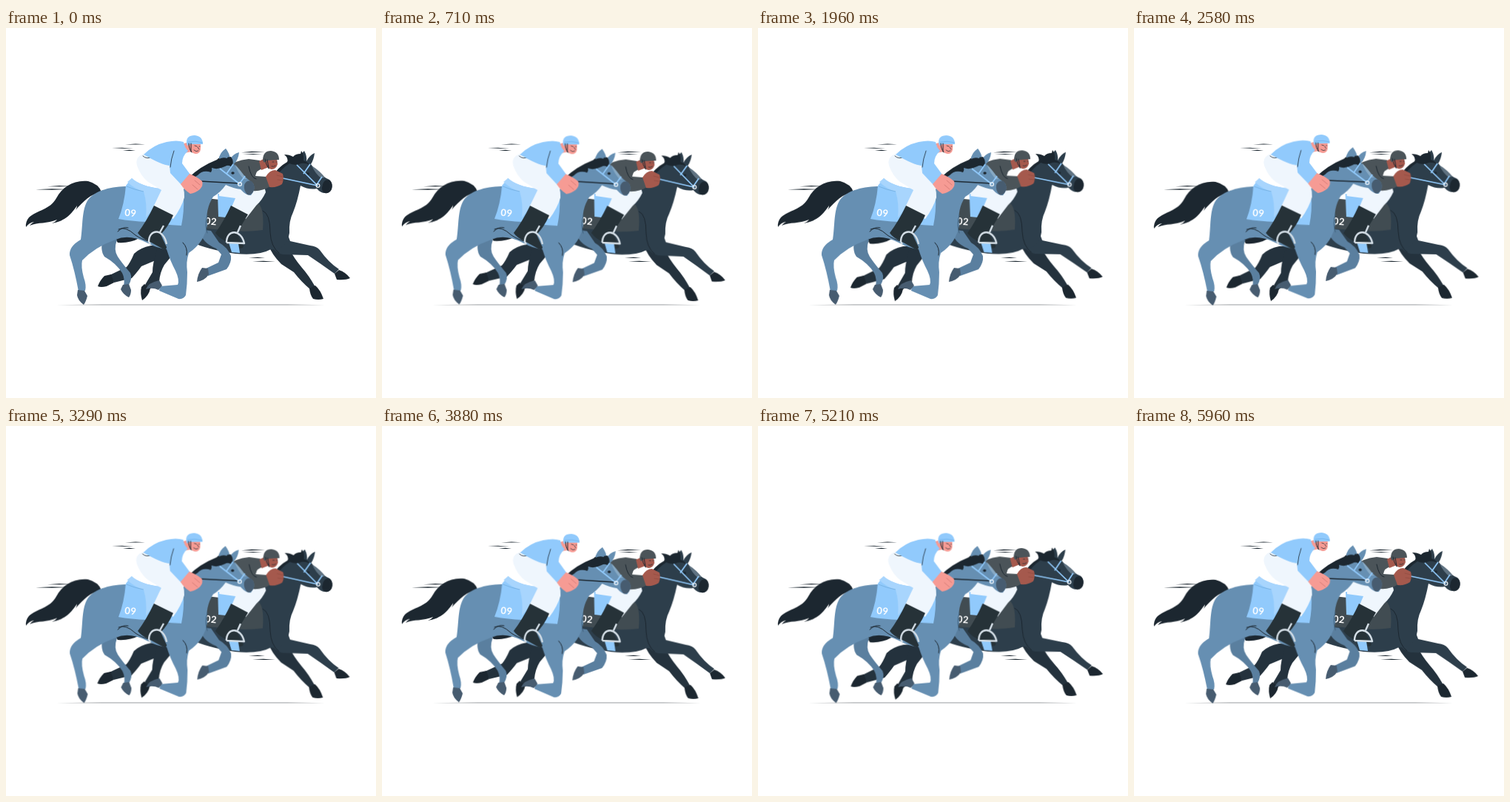
An HTML page that plays this animation: 500 px wide and 500 px high, repeating every 6000 ms.

```html
<!DOCTYPE html>
<html lang="en">
<head>
<meta charset="utf-8">
<title>Horse race</title>
<style>
  html, body { margin: 0; width: 100%; height: 100%; overflow: hidden; background: #fff; }
  svg { display: block; width: 100%; height: 100%; }
  text { font: 700 13px Lato, "Open Sans", sans-serif; letter-spacing: .6px; fill: #fff; }

  .blue { fill: #668fb2; }
  .blue-shade { fill: #5a7f9f; }
  .blue-hoof { fill: #475c70; }
  .navy { fill: #2d3e4b; }
  .navy-shade { fill: #24323d; }
  .ink { fill: #1c2730; }
  .boot { fill: #263238; }
  .sky { fill: #91cafc; }
  .pale { fill: #eff6fd; }
  .pink { fill: #f69b94; }
  .brown { fill: #a5594d; }
  .coal { fill: #4b5459; }
  .line { fill: none; stroke: #1c2730; stroke-width: 1; stroke-linecap: round; stroke-linejoin: round; }
  .strap { fill: none; stroke: #91cafc; stroke-width: 1.7; stroke-linejoin: round; }
  .stirrup { fill: none; stroke: #d5dfe7; stroke-width: 2.4; stroke-linejoin: round; }

  #far { transform-origin: 294px 266px; animation: sway 3s linear infinite; }
  #near { transform-origin: 180px 259px; animation: late-sway 6s linear infinite; }
  @keyframes sway {
    0%, 100% { transform: rotate(0deg); }
    25% { transform: rotate(1deg); }
    75% { transform: rotate(-1deg); }
  }
  /* The same sway after half a second of rest, cut off at the loop's end. */
  @keyframes late-sway {
    0%, 8.333% { transform: rotate(0deg); }
    20.833%, 70.833% { transform: rotate(1deg); }
    45.833%, 95.833% { transform: rotate(-1deg); }
    100% { transform: rotate(-.667deg); }
  }
</style>
</head>
<body>
<svg viewBox="0 0 500 500">
  <path fill="#989c9f" d="M68 374.2 L130 373.6 H380 L431 374.2 L380 374.6 H130Z"/>
  <g class="ink">
    <path d="M143 162 L157 161.8 L172 163 L157 162.8Z"/>
    <path d="M161 157.6 L175 156.4 L188 157.3 L175 157.5Z"/>
    <path d="M158 165.2 L167 164.8 L175 166 L166 166Z"/>
    <path d="M40 218.2 L62 217.2 L85 218 L62 218.7Z"/>
    <path d="M56 214.2 L72 213 L90 213.9 L72 214.3Z"/>
    <path d="M318 168.2 L332 166.8 L350 167.6 L332 168.2Z"/>
    <path d="M320 170.4 L334 169.9 L346 171 L334 171Z"/>
    <path d="M328 310.4 L340 309.8 L350 311 L340 311.1Z"/>
    <path d="M333 315.3 L348 314.7 L364 316 L348 316.1Z"/>
  </g>

  <g id="far">
    <!-- hind legs and tail -->
    <path class="ink" d="M147 276 Q160 271 180 284 Q168 291 151 290 Q146 284 147 276Z"/>
    <path class="navy-shade" d="M196 294 Q181 297 173 305 Q168 317 163 323 L140 334 L146 344 L170 338 Q178 329 183 322 L214 309 L225 293Z"/>
    <path class="ink" d="M142 333 L146 344 L136 349 Q128 351 124 349 Q127 341 133 335Z"/>
    <path class="navy-shade" d="M204 300 Q198 318 198 330 L188 347 L194 353 L207 343 Q208 330 214 320 L232 298Z"/>
    <path class="ink" d="M187 346 L195 352 Q193 362 184 368 Q181 358 183 350Z"/>

    <!-- front legs -->
    <path class="navy-shade" d="M354 292 Q359 306 372 319 L389 330 Q399 343 411 353 L418 350 Q409 334 400 324 Q389 311 382 297Z"/>
    <path class="ink" d="M410 352 L418 348 Q425 354 429 366 Q422 368 415 366 Q411 361 410 352Z"/>
    <path class="navy" d="M352 278 Q358 303 374 306 L408 307 Q426 319 444 332 L450 326 Q436 317 424 300 Q420 295 411 294 L384 288 L378 272Z"/>
    <path class="ink" d="M444 332 L450 327 Q459 330 465 338 Q459 341 447 340Z"/>

    <!-- body, neck and head -->
    <path class="navy" d="M240 238 L340 226 L358 203 Q368 187 381 182 L397 181 Q397 171 403 166 Q407 173 406 180 Q410 172 417 169 Q416 178 412 184 L419 193 Q428 201 437 205 Q442 210 440 217 Q438 224 431 223 Q425 223 420 217 Q409 219 398 213 Q394 234 388 249 Q382 261 383 277 Q379 301 358 299 Q342 308 310 305 Q271 299 250 289Z"/>
    <path class="ink" d="M358 204 Q367 188 380 181 Q382 176 376 171 Q383 171 388 174 Q391 170 398 170 L399 166 Q403 171 402 179 Q408 181 410 185 Q402 181 396 184 Q389 186 383 183 Q372 190 364 202Z"/>
    <path fill="#607382" d="M413 186 Q424 193 431 202 L426 203 Q418 197 413 186Z"/>
    <path class="ink" d="M428 211 Q431 203 438 206 Q442 211 440 218 Q437 224 431 223 Q425 221 428 211Z"/>
    <ellipse class="ink" cx="408" cy="197" rx="2" ry="1.7"/>
    <path class="line" stroke-width=".7" d="M347 247 Q357 251 357 276 Q358 296 369 304"/>
    <path class="strap" d="M393 185 L421 213 L374 203 M402 197 L411 184 M419 213 L427 201"/>
    <circle cx="421.5" cy="213" r="2.3" fill="none" stroke="#eff6fd" stroke-width="1.3"/>

    <!-- saddle cloth and rider -->
    <path fill="#414c52" d="M262 229 L342 238 Q349 246 347 273 Q328 276 306 274 L258 270Z"/>
    <path class="sky" d="M286 224 L313 228 L297 256 L287 255Z"/>
    <text x="268.5" y="265" transform="rotate(6 269 264)">02</text>
    <path class="pale" d="M288 205 L330 203 Q350 211 351 222 Q346 233 338 240 L324 258 L304 244 L310 230 L288 227Z"/>
    <path class="boot" d="M304 240 L327 252 L312 277 L321 295 Q320 299 315 297 L299 289 Q289 285 283 277 Q295 260 304 240Z"/>
    <path class="sky" d="M301 290 L314 291 L316 304 L305 303Z"/>
    <path class="stirrup" d="M313 276 L317 267 M298 290 C298 271 318 272 322 291 L298 290"/>
    <path class="coal" d="M296 190 Q308 179 328 177 L343 179 L347 190 Q338 192 337 200 L352 201 L357 214 Q346 221 333 220 L313 212Z"/>
    <path class="line" stroke-width=".7" d="M328 187 Q331 203 338 204"/>
    <path class="brown" d="M342 180 L348 177 L355 188 L345 192Z M351 201 Q356 192 364 192 L374 197 Q376 204 373 211 Q366 216 356 215Z"/>
    <path class="line" style="stroke:#8a473d;stroke-width:.6" d="M366 199 L374 201 M367 205 L374 206"/>
    <path class="brown" d="M350 176 L366 177 L367 184 Q365 191 359 191 Q351 190 350 176Z"/>
    <path class="coal" d="M347 179 Q347 166 358 166 Q369 167 369 178 L353 179 L349 182Z"/>
    <path class="line" d="M350 177 Q351 184 355 190 M353 178 L355 189"/>
    <path class="line" style="stroke-width:.7" d="M360 181 L362 181 M365 181 L366 181 M359 187 Q362 188 364 186"/>
  </g>

  <g id="near">
    <path class="ink" d="M129 222 Q126 211 111 207 C91 205 76 215 68 230 C59 246 42 246 31 256 Q26 262 27 269 Q31 263 38 262 Q34 264 32 267 C44 262 55 265 69 259 Q66 263 62 264 C81 261 89 250 96 240 Q96 243 94 246 C105 234 114 224 129 222Z"/>

    <!-- far legs -->
    <path class="blue-shade" d="M132 281 Q126 299 133 309 Q149 318 157 331 Q161 339 159 349 L166 347 Q171 338 168 331 Q157 318 151 309 Q145 300 150 286Z"/>
    <path class="blue-hoof" d="M158 347 L166 346 L169 354 Q169 360 166 364 Q158 360 155 353Z"/>
    <path class="blue-shade" d="M261 272 Q264 290 284 298 L291 306 L287 317 L268 326 L273 335 L298 326 Q305 317 304 308 Q299 296 288 290 L277 274Z"/>
    <path class="blue-hoof" d="M265 324 L273 325 L274 333 Q269 341 258 343 Q259 332 265 324Z"/>

    <!-- body, neck, head and near legs -->
    <path class="blue" d="M165 214 C143 214 121 219 111 232 C102 245 104 267 101 286 Q85 295 86 307 Q93 328 98 356 L107 355 Q109 348 105 337 Q101 322 103 314 Q120 296 148 286 Q166 278 190 290 Q205 298 217 299 Q222 315 229 328 Q235 341 232 347 L208 349 L207 355 L233 366 Q240 367 243 361 Q245 346 245 330 Q243 316 247 304 Q268 290 272 266 Q269 245 280 228 Q290 222 297 212 Q308 217 317 218 Q325 227 331 226 Q338 218 334 210 Q326 204 319 197 L308 184 Q314 178 315 168 Q307 170 303 177 Q302 169 297 163 Q289 169 287 178 Q269 186 251 205 L239 219 Q203 225 165 214Z"/>
    <path class="blue-hoof" d="M97 354 L106 355 L110 362 Q108 370 105 374 Q97 368 96 361Z M189 353 Q192 344 207 341 L211 348 L206 354 Q198 350 189 353Z"/>
    <path class="line" d="M151 275 Q158 268 165 270 M152 272 Q161 267 175 280 Q182 285 195 289 M239 290 Q246 297 244 307"/>
    <path class="line" style="stroke:#41637f" d="M272 253 Q268 266 272 277"/>
    <path class="ink" d="M246 203 Q262 187 285 178 Q289 173 297 175 L304 174 Q309 181 305 188 Q301 184 296 187 Q286 192 278 189 Q279 192 277 195 Q266 191 259 199 Q253 202 250 207Z"/>
    <path class="blue" d="M288 177 Q289 168 297 163 Q301 170 299 176 Q293 174 288 177Z"/>
    <path fill="#87a9c4" d="M309 184 Q317 192 325 204 L321 204 Q313 195 309 184Z"/>
    <path class="blue-hoof" d="M322 212 Q325 205 332 207 Q337 213 335 219 Q332 227 326 225 Q321 220 322 212Z"/>
    <ellipse class="ink" cx="306.5" cy="196" rx="2.2" ry="1.7"/>
    <path class="line" style="stroke-width:1.7" d="M262 207 L316 210"/>
    <path class="strap" d="M289 190 L316 211 M298 197 L307 184 M315 211 L323 200"/>
    <circle cx="316" cy="211" r="2.4" fill="none" stroke="#eff6fd" stroke-width="1.3"/>

    <!-- saddle cloth -->
    <path class="sky" d="M162 213 L170 203 Q182 214 209 217 L240 228 Q241 248 237 267 Q211 266 191 262 Q169 261 152 258 Q160 238 162 213Z"/>
    <path fill="#a8d5fd" d="M164 208 L170 203 Q182 214 208 217 L212 222 L200 243 L189 256 Q191 238 186 221 Q173 217 164 208Z"/>
    <path fill="none" stroke="#71addd" stroke-width=".8" d="M163 214 Q175 219 186 221"/>
    <text x="160" y="253.8" transform="rotate(5 160 253)">09</text>

    <!-- rider -->
    <path class="pale" d="M186 170 Q174 174 177 186 Q182 200 192 208 L210 219 L199 242 L226 258 Q237 243 241 229 Q242 215 233 207 L222 186 L203 177Z"/>
    <path class="line" style="stroke-width:.8" d="M185 173 Q190 178 198 174"/>
    <path class="boot" d="M200 240 L226 253 Q219 269 209 279 L217 296 Q217 301 211 298 L193 288 Q183 284 178 277 Q190 261 200 240Z"/>
    <path class="stirrup" d="M208 276 L213 267 M193 289 C193 271 213 270 217 292 M193 289 L195 292"/>
    <path class="pink" d="M237 157 L248 154 L251 167 L241 169Z"/>
    <path class="sky" d="M186 171 Q199 158 217 154 Q231 151 240 154 Q241 161 246 166 Q238 173 238 183 L249 198 L237 212 L222 196 L221 186 Q210 185 186 171Z"/>
    <path class="line" style="stroke-width:.8" d="M227 166 Q223 177 222 188"/>
    <path class="pink" d="M236 211 L248 197 Q258 201 265 207 Q267 213 262 218 Q256 223 249 224 Q241 219 236 211Z"/>
    <path class="line" style="stroke:#c9706c;stroke-width:.7" d="M255 206 L262 212 M252 212 L259 218"/>
    <path class="pink" d="M247 155 L263 156 L263 164 Q262 170 256 170 Q248 169 247 155Z"/>
    <path class="sky" d="M244 156 Q243 145 255 145 Q266 146 266 157 L249 157 L245 159Z"/>
    <path fill="none" stroke="#68aee8" stroke-width=".7" d="M246 154 Q256 152 266 155"/>
    <path class="line" d="M247 156 Q247 163 251 168 M250 156 L250 167"/>
    <path class="line" style="stroke-width:.7" d="M255 159 L258 160 M261 160 L262 160 M259 161 L261 164 M254 165 Q257 168 260 166"/>
  </g>
</svg>
</body>
</html>
```
